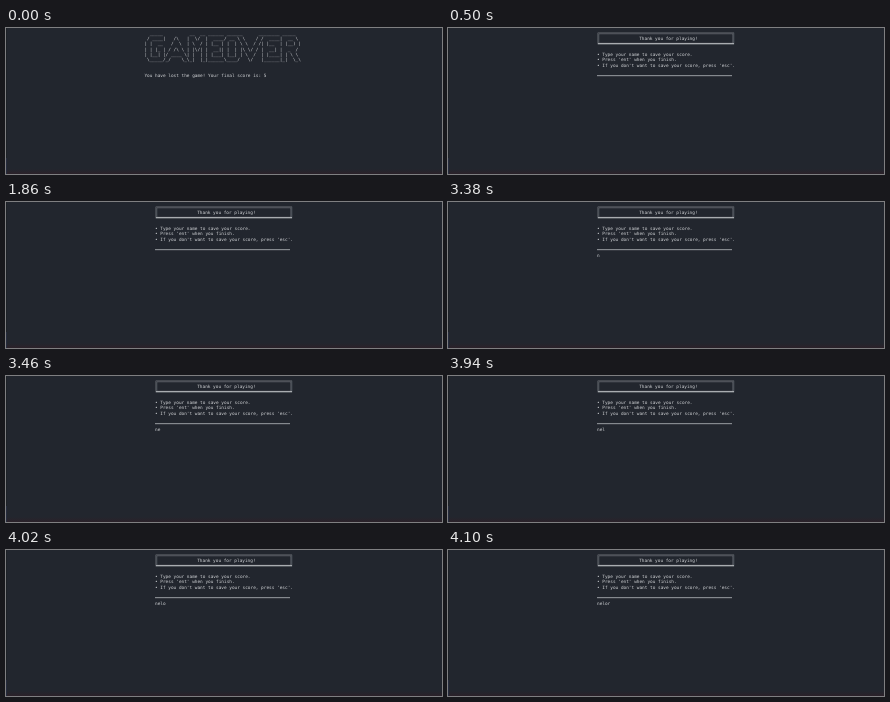
Recreate the animation shown at these times as an HTML page. Size 436 by 146 pixels, loop 8 s.

```html
<!DOCTYPE html>
<html lang="en">
<head>
<meta charset="utf-8">
<title>Game over</title>
<style>
  html, body { margin: 0; width: 100%; height: 100%; overflow: hidden; background: #22262e; }
  svg { display: block; width: 436px; height: 146px; }
  text {
    font-family: "DejaVu Sans Mono", monospace;
    font-size: 4.43px;
    fill: #d3d5d8;
    white-space: pre;
    text-rendering: geometricPrecision;
  }
</style>
</head>
<body>
<svg viewBox="0 0 436 146">
  <defs>
    <linearGradient id="edge" x1="0" y1="0" x2="0" y2="1">
      <stop offset="0" stop-color="#22262e"/>
      <stop offset="1" stop-color="#2b2129"/>
    </linearGradient>
  </defs>
  <rect width="436" height="146" fill="#22262e"/>
  <rect y="141" width="436" height="5" fill="url(#edge)"/>
  <rect width="1" height="130" fill="#1d2126"/>
  <rect y="130" width="1" height="16" fill="#252b3d"/>

  <g id="over"></g>

  <g id="save">
    <g fill="none" stroke="#8b8f94" stroke-width=".45">
      <rect x="149.9" y="4.9" width="136" height="11.2"/>
      <rect x="150.9" y="5.9" width="134" height="9.2"/>
    </g>
    <rect x="150" y="15" width="136" height="1.1" fill="#a9acb0"/>
    <rect x="149" y="47" width="135" height="1.2" fill="#85898e"/>
  </g>
</svg>
<script>
const LOOP = 8000, SAVE_AT = 500;
const ROW = 5.33, BASE = 6.6;
const NAME = "nelor";
const KEY_TIMES = [3380, 3460, 3940, 4020, 4100];

const ART = String.raw`
  _____          __  __ ______ ______      ________ _____
 / ____|   /\   |  \/  |  ____/ __ \ \    / /  ____|  __ \
| |  __   /  \  | \  / | |__ | |  | \ \  / /| |__  | |__) |
| | |_ | / /\ \ | |\/| |  __|| |  | |\ \/ / |  __| |  _  /
| |__| |/ ____ \| |  | | |___| |__| | \  /  | |____| | \ \
 \_____/_/    \_\_|  |_|______\____/   \/   |______|_|  \_\
`.split("\n").slice(1, 7);

const over = document.getElementById("over");
const save = document.getElementById("save");

function line(parent, x, row, content) {
  const el = document.createElementNS("http://www.w3.org/2000/svg", "text");
  el.setAttribute("x", x);
  el.setAttribute("y", BASE + row * ROW);
  el.textContent = content;
  parent.append(el);
  return el;
}

ART.forEach((content, row) => line(over, 138.4, row, content));
line(over, 138.4, 8, "You have lost the game! Your final score is: 5");

line(save, 191.2, 1, "Thank you for playing!");
[
  "• Type your name to save your score.",
  "• Press 'ent' when you finish.",
  "• If you don't want to save your score, press 'esc'."
].forEach((content, i) => line(save, 149, 4 + i, content));
const input = line(save, 149, 9, "");

function draw(t) {
  const saving = t >= SAVE_AT;
  over.style.display = saving ? "none" : "";
  save.style.display = saving ? "" : "none";
  input.textContent = NAME.slice(0, KEY_TIMES.filter(k => t >= k).length);
}

const start = performance.now();
function tick() {
  draw((performance.now() - start) % LOOP);
  requestAnimationFrame(tick);
}
tick();
</script>
</body>
</html>
```
